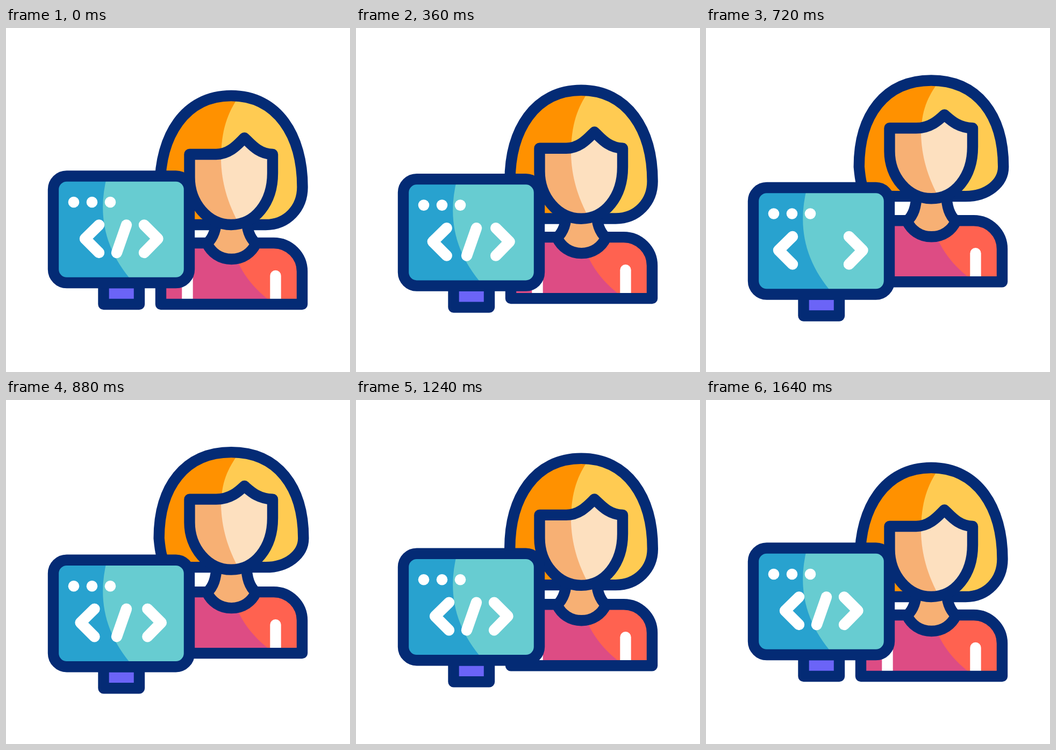
These frames come from a looping animation (640 by 640 pixels, 1880 ms). An HTML page with a canvas:

```html
<!DOCTYPE html>
<html lang="en">
<head>
<meta charset="utf-8">
<style>
html, body { margin: 0; width: 100%; height: 100%; overflow: hidden; background: #fff; }
canvas { display: block; }
</style>
</head>
<body>
<canvas id="stage" width="640" height="640"></canvas>
<script>
const ctx = document.getElementById('stage').getContext('2d');
const LOOP = 1880, STEP = 40;
const NAVY = '#042b75', SKIN = '#f7b074';

const ramp = (t, a, b) => Math.min(1, Math.max(0, (t - a) / (b - a)));
const smooth = u => u * u * (3 - 2 * u);
const steep = u => u ** 1.9 / (u ** 1.9 + (1 - u) ** 1.9);

// Filled, outlined shape; an optional lighter area covers its right side.
function shape(d, fill, light, split, decorate) {
  const path = new Path2D(d);
  ctx.fillStyle = fill;
  ctx.fill(path);
  if (light) {
    ctx.save();
    ctx.clip(path);
    ctx.fillStyle = light;
    ctx.fill(new Path2D(split));
    ctx.restore();
  }
  if (decorate) decorate();
  ctx.strokeStyle = NAVY;
  ctx.stroke(path);
}

function line(d, dx = 0) {
  const path = new Path2D();
  path.addPath(new Path2D(d), { e: dx });
  ctx.strokeStyle = '#fff';
  ctx.stroke(path);
}

function shifted(dy, paint) {
  ctx.save();
  ctx.translate(0, dy);
  paint();
  ctx.restore();
}

function hair(squash) {
  const top = 126 + squash, mid = 200 + .3 * squash;
  const side = 296 + .3 * squash, bottom = 366 - .85 * squash;
  const left = 286.5 - .13 * squash, right = 551.5 + .13 * squash;
  const corner = side + (bottom - side) * .56;
  shape(`M419 ${top} C505 ${top} ${right} ${mid} ${right} ${side}
    C${right} ${corner} 523 ${bottom} 483 ${bottom} H355
    C${left + 10} ${bottom} ${left + 5} ${bottom} ${left} ${side}
    C${left} ${mid} 333 ${top} 419 ${top} Z`,
    '#ff9100', '#ffcb52',
    `M434 ${top} C412 ${top + 32} 400 ${mid - 10} 400 245 V400 H600 V${top} Z`);
}

function shirt() {
  shape('M341 400 H498 A53 53 0 0 1 551 453 V514 H288 V453 A53 53 0 0 1 341 400 Z',
    '#dd4c84', '#ff6250', 'M420 400 C430 450 462 488 500 514 H570 V400 Z',
    () => {
      line('M337.5 461 V510');
      line('M501.5 461 V510');
    });
  shape(`M392 350 C391 375 386 390 374 401 C382 418 398 430 419.5 430
    S457 418 465 401 C453 390 448 375 447 350`, SKIN);
}

function face(squash) {
  const peak = 204.5 + .42 * squash;
  shape(`M341.5 235 H391 C417 235 433 ${peak + 10} 443.5 ${peak}
    C454 ${peak + 9} 468 234 496 235 V270 C496 325 463 366 419 366
    C375 366 341.5 325 341.5 278 Z`,
    SKIN, '#fde0bf', 'M400 190 V245 C401 288 412 325 434 366 H520 V190 Z');
}

function monitor(spread, slash) {
  shape('M181.5 474 V514 H248 V474 Z', '#6b64f7');
  shape('M113 275.5 H316 A25 25 0 0 1 341 300.5 V449 A25 25 0 0 1 316 474 H113 A25 25 0 0 1 88 449 V300.5 A25 25 0 0 1 113 275.5 Z',
    '#28a2cf', '#67ccd1', 'M188 275 C170 345 182 412 237 474 H350 V275 Z');
  ctx.fillStyle = '#fff';
  for (const x of [126, 160, 194]) {
    ctx.beginPath();
    ctx.arc(x, 324, 10.3, 0, 7);
    ctx.fill();
  }
  line('M173 366.5 L147 392 L173 418', -12 * spread);
  line('M257 366.5 L282.5 392 L257 418', 9 * spread);
  if (slash) line('M224 366.5 L206 418');
}

function draw(t) {
  const lift = 43 * (t < 840 ? steep(ramp(t, 100, 820)) : 1 - steep(ramp(t, 850, 1598)));
  const squash = 13.2 * (lift / 41.7) ** 2.2;
  const spread = smooth(ramp(t, 200, 600)) - smooth(ramp(t, 740, 1130));

  ctx.fillStyle = '#fff';
  ctx.fillRect(0, 0, 640, 640);
  ctx.lineWidth = 20.4;
  ctx.lineCap = ctx.lineJoin = 'round';

  shifted(-lift, () => {
    hair(squash);
    shirt();
  });
  shifted(-lift - .53 * squash, () => face(squash));
  shifted(.517 * lift, () => monitor(spread, t < 620 || t >= 840));
}

function tick() {
  const t = performance.now() % LOOP;
  draw(Math.floor(t / STEP) * STEP);
  requestAnimationFrame(tick);
}
tick();
</script>
</body>
</html>
```
